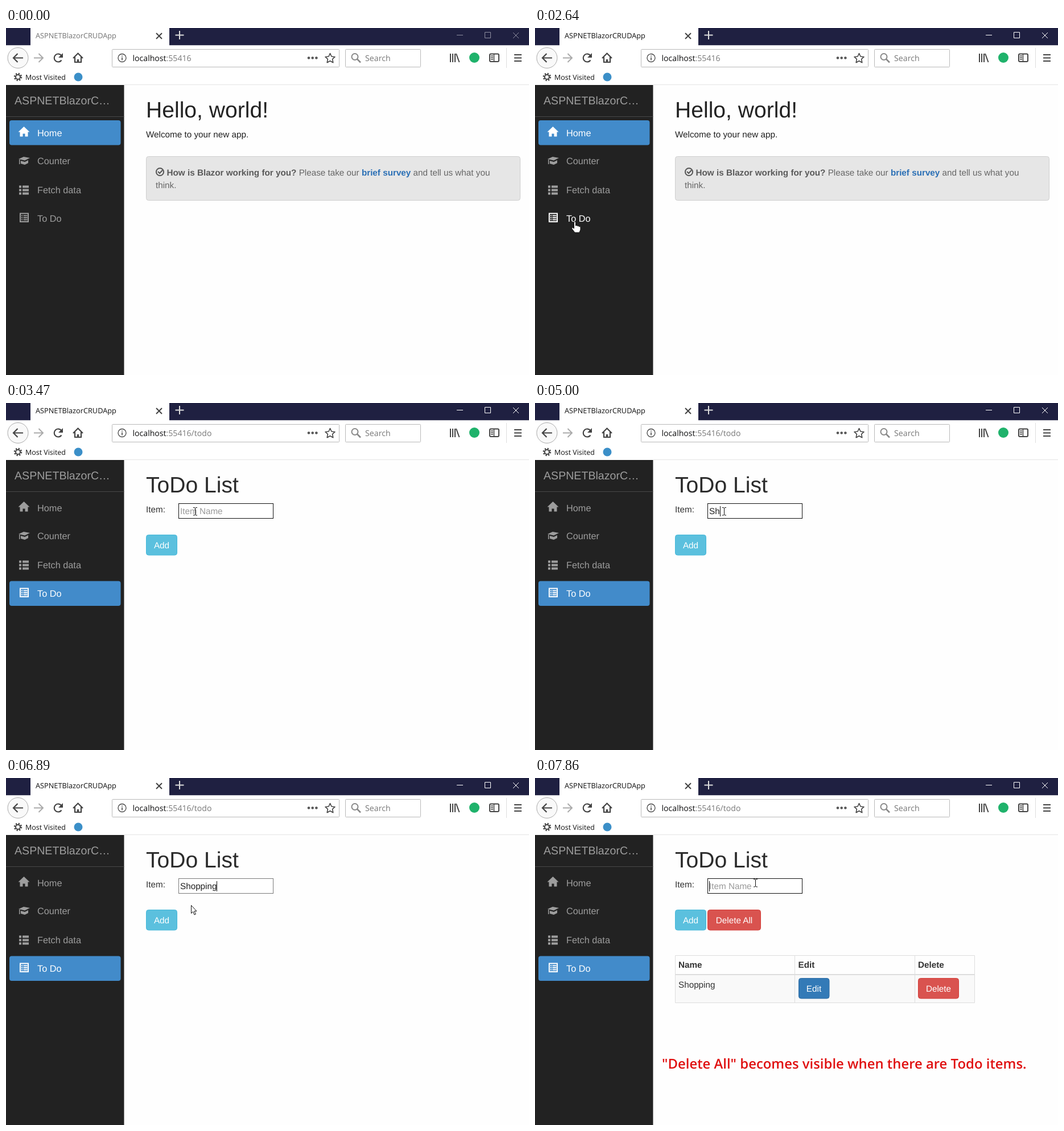
Recreate the animation shown at these times as an HTML page. Size 919 by 609 pixels, loop 8 s.

```html
<!DOCTYPE html>
<html lang="en">
<head>
<meta charset="utf-8">
<title>To-do demo</title>
<style>
html, body { margin: 0; width: 100%; height: 100%; overflow: hidden; background: #fefefe }
svg { display: block; font: 15.25px "Liberation Sans", Arial, sans-serif; fill: #333; text-rendering: geometricPrecision }
text { white-space: pre }
.ui { font-family: "Open Sans", "Noto Sans", sans-serif }
.line { fill: none; stroke: #444; stroke-width: 2 }
.box { fill: #fff; stroke: #b9b9b9 }
.nav { font-size: 16.3px; fill: currentColor }
.nav .line { stroke: currentColor }
.btn text { fill: #fff; text-anchor: middle }
.cursor { fill: #fff; stroke: #111; stroke-linejoin: round }
.h1 { font-size: 39.1px }
.b { font-weight: bold }
</style>
</head>
<body>
<svg width="919" height="609" viewBox="0 0 919 609">
  <!-- title bar -->
  <path fill="#1f2041" d="M0 0H919V30.500H0Z"/>
  <path fill="#fff" d="M43 0H287V30.500H919V100H0V30.500H43Z"/>
  <text id="tab" class="ui" x="52" y="18" font-size="12.75">ASPNETBlazorCRUDApp</text>
  <path class="line" d="M264 9l10 10m0-10l-10 10"/>
  <path class="line" style="stroke:#ddd" d="M297.500 12.500h15m-7.500-7.500v15"/>
  <path id="win" class="line" style="stroke-width:1" d="M792 12.500h11M841.500 7.500h10v10h-10zM891 8l10 10m0-10l-10 10"/>

  <!-- toolbar -->
  <circle cx="21" cy="52.500" r="18" fill="#f9f9f9" stroke="#aaa"/>
  <path class="line" style="stroke-width:2.200" d="M30 52.500H13m7.500-7.500l-7.500 7.500 7.500 7.500"/>
  <path class="line" style="stroke:#aaa" d="M49 52.500h16m-7.500-7.500l7.500 7.500-7.500 7.500"/>
  <path class="line" style="stroke-width:2.200" d="M97.500 56.500a7 7 0 1 1 0-8"/>
  <path fill="#444" d="M100 44v8h-8z"/>
  <path class="line" style="stroke-width:2.200" d="M118 53l8.500-8.500 8.500 8.500M121 51v9h11v-9"/>
  <path fill="#444" d="M125 55h3v5h-3z"/>
  <rect class="box" x="186.500" y="37.500" width="399" height="31" rx="1"/>
  <circle class="line" cx="204" cy="52.500" r="7" style="stroke-width:1.300"/>
  <path class="line" style="stroke-width:1.600" d="M204 51.500v5m0-8v1.600"/>
  <text class="ui" x="222.500" y="58" font-size="14.1" fill="#0c0c0d">localhost<tspan id="url" fill="#777"></tspan></text>
  <g fill="#555"><circle cx="532" cy="52.500" r="2.300"/><circle cx="538.700" cy="52.500" r="2.300"/><circle cx="545.400" cy="52.500" r="2.300"/></g>
  <path class="line" style="stroke-width:1.600" stroke-linejoin="round" d="M569.500 44.500l2.500 5.500 6 .7-4.400 4 1.200 6-5.300-3-5.300 3 1.200-6-4.400-4 6-.7z"/>
  <rect class="box" x="596.500" y="37.500" width="132" height="31" rx="1"/>
  <g class="line" style="stroke:#888"><circle cx="613" cy="50.500" r="5.500"/><path d="M617 54.500l6 6" stroke-width="2.500"/></g>
  <text class="ui" x="631" y="58" font-size="14.2" fill="#777">Search</text>
  <path class="line" d="M781 45v15m4-15v15m4-15v15m2-15l5.500 15"/>
  <circle cx="823" cy="52" r="9" fill="#1fb26b"/>
  <rect class="line" x="850" y="45.500" width="16" height="13.500" rx="2"/>
  <path class="line" d="M857.500 45v14" style="stroke-width:1.500"/>
  <path class="line" style="stroke-width:1.300" d="M852 49h4m-4 3h4m-4 3h4"/>
  <path stroke="#ddd" d="M879.500 35v35"/>
  <path class="line" d="M893 47h13m-13 5.500h13m-13 5.500h13"/>

  <!-- bookmarks -->
  <circle class="line" cx="21" cy="86" r="4"/>
  <circle class="line" cx="21" cy="86" r="6" stroke-dasharray="2.350" style="stroke-width:2.500"/>
  <text class="ui" x="34" y="91" font-size="12.45" fill="#111">Most Visited</text>
  <circle cx="127" cy="86" r="7.500" fill="#3b8fc8"/>
  <path stroke="#e4e4e4" d="M208 99.500h711"/>

  <!-- sidebar -->
  <path fill="#222" d="M0 100H207.500V609H0Z"/>
  <path stroke="#484848" d="M0 155.500h207.500"/>
  <text x="15" y="134" font-size="19.6" fill="#9d9d9d">ASPNETBlazorC…</text>
  <rect id="active" x="6" width="195.500" height="43.500" rx="4" fill="#428bca"/>
  <g id="nav"></g>

  <g id="home">
    <text class="h1" x="246" y="157" fill="#222">Hello, world!</text>
    <text x="246" y="192" fill="#222">Welcome to your new app.</text>
    <rect x="246.500" y="225.500" width="657" height="77" rx="4" fill="#e6e6e6" stroke="#cfcfcf"/>
    <circle class="line" cx="270.500" cy="252.500" r="6.500" style="stroke:#555"/>
    <path class="line" style="stroke:#555" d="M267 252l3 3 5-5.500"/>
    <text x="282.500" y="258.500" fill="#666"><tspan class="b" fill="#5a5a5a">How is Blazor working for you?</tspan> Please take our <tspan class="b" fill="#2a6fb5">brief survey</tspan> and tell us what you<tspan x="263" y="280.500">think.</tspan></text>
  </g>

  <g id="todo">
    <text class="h1" x="246" y="157" fill="#2b2b2b">ToDo List</text>
    <text x="246" y="192">Item:</text>
    <rect id="input" x="303.500" y="176.500" width="166" height="26" fill="#fff"/>
    <text id="value" x="306" y="195"></text>
    <path id="caret" stroke="#111" d="M.5 181v18"/>
    <g class="btn" id="add"><rect x="246.500" y="231.500" width="54" height="35.500" rx="4"/><text x="273.500" y="254.500">Add</text></g>
    <g id="list">
      <path fill="#f9f9f9" d="M246 345h526v49H246z"/>
      <path fill="none" stroke="#ddd" d="M246.500 311.500h526v83h-526zM456.500 311v83M667.500 311v83"/>
      <path stroke="#ddd" stroke-width="2" d="M246 345h527"/>
      <g class="b"><text x="252" y="333">Name</text><text x="462.500" y="333">Edit</text><text x="673" y="333">Delete</text></g>
      <text x="252" y="368">Shopping</text>
      <g class="btn">
        <rect x="303.500" y="231.500" width="93" height="35.500" rx="4" fill="#d9534f" stroke="#d43f3a"/><text x="350" y="254.500">Delete All</text>
        <rect x="463.500" y="351.500" width="53.500" height="35.500" rx="4" fill="#337ab7" stroke="#2e6da4"/><text x="490" y="374.500">Edit</text>
        <rect x="673.500" y="351.500" width="71" height="35.500" rx="4" fill="#d9534f" stroke="#d43f3a"/><text x="709" y="374.500">Delete</text>
      </g>
    </g>
    <text id="note" class="ui" x="223" y="510" font-size="23.9" font-weight="600" fill="#e01010">"Delete All" becomes visible when there are Todo items.</text>
  </g>

  <g id="cursor" class="cursor">
    <path id="arrow" d="M.5.5V14.500L3.800 11.500 6 17 8.300 16 6 10.700H10Z"/>
    <path id="hand" d="M-1.500 1.500C-1.500-.5 1.500-.5 1.500 1.500V7C3 6 4.500 6.500 4.500 7.500 6 7 7.300 7.500 7.300 8.500 9 8 10 9 10 10.500V14L8 19H0L-5 12.500C-5.500 10.500-4 9.500-2.500 11L-1.500 12Z"/>
    <path id="beam" fill="none" d="M-3-6.500H-1L.5-5.500 2-6.500H4M.5-5.500V6M-3 7H-1L.5 6 2 7H4"/>
  </g>
</svg>
<script>
const $ = id => document.getElementById(id);
const LOOP = 8000, TICK = 75, OPEN = 2800, SAVED = 7410;

const items = [
  ['Home', 162, '<path d="M31.500 173l10 9.500h-3v8h-5v-5h-4v5h-5v-8h-3z"/>'],
  ['Counter', 211.5, '<path d="M22 230l9-4 11 2-9 4.500zM26 233l7 2 6-3v5l-6 3-7-2zM23 231h1.500v8H23z"/>'],
  ['Fetch data', 262.5, '<path class="line" style="stroke-width:4" d="M23 278.500h4m2 0h11M23 284.500h4m2 0h11M23 290.500h4m2 0h11"/>'],
  ['To Do', 312.5, '<path class="line" d="M25 325.500h14v14.500h-14zM27 329.500h2m1.500 0h7m-10.500 3.500h2m1.500 0h7m-10.500 3.500h2m1.500 0h7"/>']
];
$('nav').innerHTML = items.map(([name, y, icon]) =>
  `<g class="nav">${icon}<text x="55" y="${y + 27.5}">${name}</text></g>`).join('');
const links = [...$('nav').children];

// pointer tip: time, x, y
const route = [
  [440, 574, 12], [1040, 108, 325], [1190, 86, 357], [1480, 70, 340],
  [2876, 70, 340], [3176, 215, 316], [3470, 332, 190],
  [6750, 332, 190], [6890, 325, 223], [7110, 275, 252],
  [7706, 275, 252], [7780, 331, 218], [7860, 387, 184], [LOOP, 387, 184]
];

// input field: time, letters typed, caret shown
const typing = [
  [0, 0, 0], [3620, 0, 1], [4090, 0, 0], [4610, 0, 1], [4770, 1, 1], [5000, 2, 1],
  [5150, 2, 0], [5290, 3, 1], [5450, 4, 1], [5600, 5, 1], [5690, 5, 0], [5850, 6, 1],
  [6130, 6, 0], [6610, 7, 1], [6690, 8, 1], [7260, 8, 0], [SAVED, 0, 0], [7860, 0, 1]
];

const show = (id, on) => $(id).style.display = on ? '' : 'none';
const paint = (el, fill, stroke) => { el.style.fill = fill; el.style.stroke = stroke; };
const inside = ([x, y], l, t, r, b) => x >= l && x <= r && y >= t && y <= b;

function pointerAt(t) {
  const i = route.findIndex(k => k[0] > t);
  if (i < 1) return [-99, -99];
  const [t0, x0, y0] = route[i - 1], [t1, x1, y1] = route[i];
  const u = Math.floor((t - t0) / TICK) * TICK / (t1 - t0);
  return [x0 + (x1 - x0) * u, y0 + (y1 - y0) * u].map(Math.round);
}

function draw(t) {
  const opened = t >= OPEN, focused = t >= 2640, tip = pointerAt(t);
  const active = opened ? 3 : 0;
  const over = items.findIndex(([, y]) => inside(tip, 6, y, 201, y + 43));
  const overInput = opened && inside(tip, 303, 176, 470, 203);
  const overAdd = opened && inside(tip, 246, 231, 301, 267);

  $('tab').style.fill = focused ? '#111' : '#737373';
  $('win').style.stroke = focused ? '#fff' : '#8e8ea0';
  $('url').textContent = ':55416' + (opened ? '/todo' : '');
  $('active').setAttribute('y', items[active][1]);
  links.forEach((el, i) => el.style.color = i === active || i === over ? '#fff' : '#9d9d9d');
  show('home', !opened);
  show('todo', opened);
  show('list', t >= SAVED);
  $('note').style.opacity = t < 7490 ? 0 : t < 7550 ? .5 : 1;

  const [, count, caret] = typing.findLast(k => k[0] <= t);
  const value = $('value');
  value.textContent = 'Shopping'.slice(0, count) || 'Item Name';
  value.style.fill = count ? '#222' : '#999';
  const width = count && opened ? value.getComputedTextLength() : 0;
  $('caret').setAttribute('transform', `translate(${Math.round(306 + width)})`);
  show('caret', caret);
  $('input').style.stroke = overInput ? '#111' : '#7a7a7a';
  paint($('add').firstChild, overAdd ? '#31b0d5' : '#5bc0de', overAdd ? '#269abc' : '#46b8da');

  const kind = overInput ? 'beam' : over >= 0 || overAdd ? 'hand' : 'arrow';
  for (const id of ['arrow', 'hand', 'beam']) show(id, id === kind);
  $('cursor').setAttribute('transform', `translate(${tip})`);
}

const start = performance.now();
function frame() {
  draw((performance.now() - start) % LOOP);
  requestAnimationFrame(frame);
}
frame();
</script>
</body>
</html>
```
